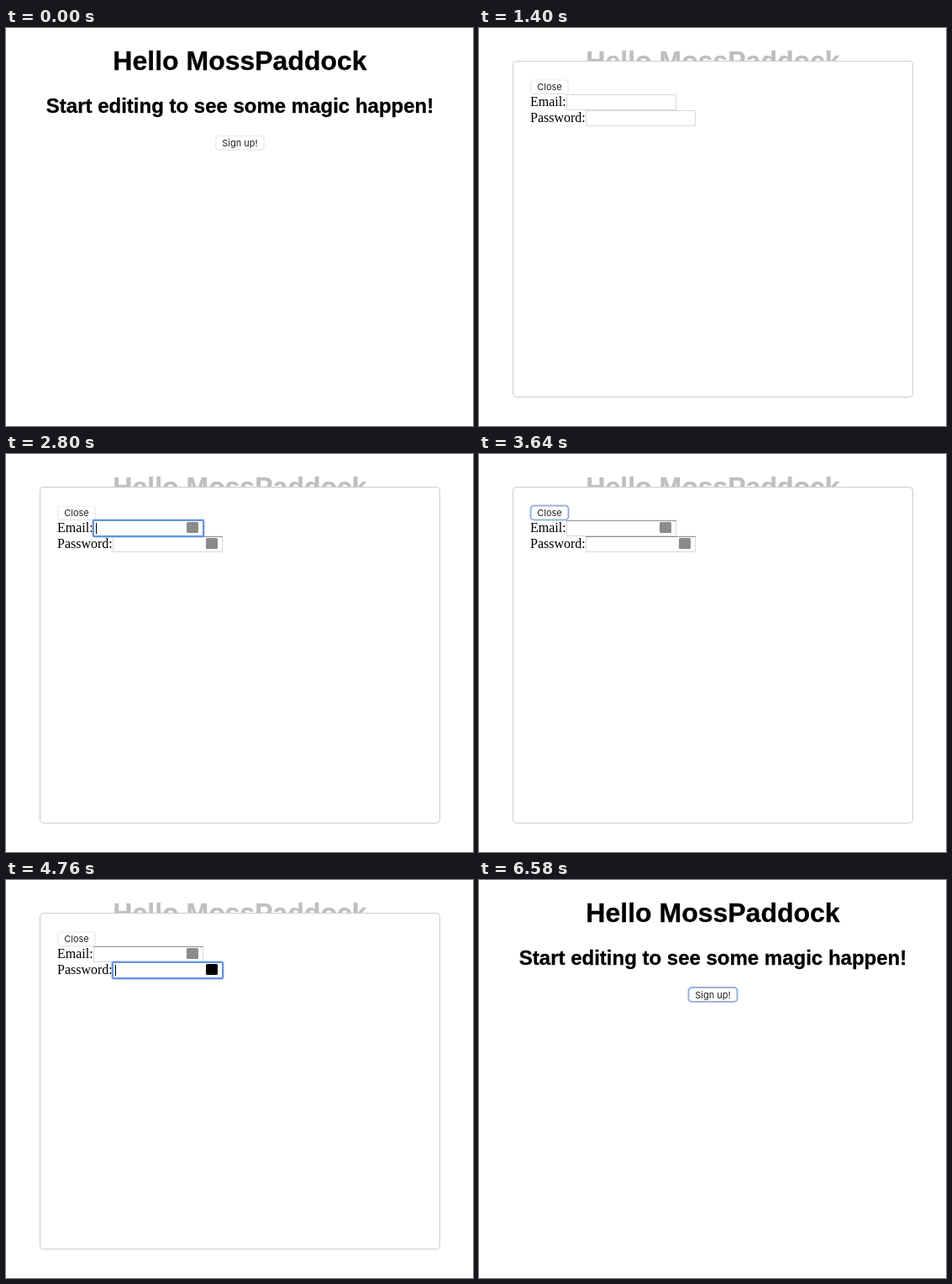
These frames come from a looping animation (556x474 px, 7.07 s). An HTML page with a canvas:

```html
<!DOCTYPE html>
<html lang="en">
<head>
<meta charset="utf-8">
<title>Sign-up dialog</title>
<style>
  html, body { margin: 0; width: 100%; height: 100%; overflow: hidden; background: #fff; }
  canvas { display: block; }
</style>
</head>
<body>
<canvas id="stage" width="556" height="474"></canvas>
<script>
const ctx = document.getElementById('stage').getContext('2d');
const LOOP = 7070;
const SANS = '"Liberation Sans", Arial, sans-serif';
const SERIF = '"Liberation Serif", Times, serif';
const UI = 'Inter, sans-serif';

const OPEN = 1400, CLOSE = 6580, FIELDS_READY = 2310, ICON_ACTIVE = 4760;

// Keyboard focus inside the dialog: [start, control]
const FOCUS = [
  [2240, 'close'], [2800, 'email'], [3220, 'password'],
  [3640, 'close'], [4200, 'email'], [4690, 'password']
];
// Times at which the caret is hidden
const CARET_OFF = [[5250, 5810], [6300, CLOSE]];

const FIELDS = [
  { id: 'email', label: 'Email:', x: 104, y: 79, baseline: 93 },
  { id: 'password', label: 'Password:', x: 127, y: 98, baseline: 112 }
];

function text(str, x, y, font, color = '#000', align = 'left') {
  ctx.font = font;
  ctx.fillStyle = color;
  ctx.textAlign = align;
  ctx.fillText(str, x, y);
}

// Bold heading with the slightly heavier stems of smoothed type
function heading(str, y, size) {
  text(str, 278.5, y, `bold ${size}px ${SANS}`, '#000', 'center');
  ctx.strokeStyle = '#000';
  ctx.lineWidth = 0.3;
  ctx.strokeText(str, 278.5, y);
}

function box(x, y, w, h, r) {
  ctx.beginPath();
  ctx.roundRect(x, y, w, h, r);
}

function fillBox(x, y, w, h, r, color) {
  box(x, y, w, h, r);
  ctx.fillStyle = color;
  ctx.fill();
}

function strokeBox(x, y, w, h, r, color, width = 1) {
  box(x, y, w, h, r);
  ctx.strokeStyle = color;
  ctx.lineWidth = width;
  ctx.stroke();
}

function button(label, x, y, w, baseline, focused) {
  const h = 17;
  if (focused) {
    fillBox(x, y, w, h, 4, '#fff');
    strokeBox(x, y, w, h, 4, '#9ab3dc', 2);
  } else {
    fillBox(x, y + 0.5, w, h, 4, '#dcdcdc');
    fillBox(x, y, w, h, 4, '#ebebeb');
    fillBox(x + 1, y + 1, w - 2, h - 1.5, 3, '#fff');
  }
  text(label, x + w / 2, baseline, '11px ' + UI, '#222', 'center');
}

function field({ id, label, x, y, baseline }, t, focused) {
  const w = 131, h = 19, ready = t >= FIELDS_READY;
  text(label, 61, baseline, '16px ' + SERIF);
  ctx.fillStyle = '#fff';
  ctx.fillRect(x, y, w, h);
  strokeBox(x + 0.5, y + 0.5, w - 1, h - 1, 0, '#d9d9d9');
  if (ready) {
    ctx.fillStyle = '#8e8e8e';
    ctx.fillRect(x, y, w, 1);
  }
  if (focused) {
    strokeBox(x, y, w, h, 2, 'rgba(90,140,225,0.35)', 4);
    strokeBox(x, y, w, h, 1, '#6594df', 2);
    ctx.fillStyle = '#fff';
    ctx.fillRect(x + 1, y + 1, w - 2, h - 2);
    if (!CARET_OFF.some(([a, b]) => t >= a && t < b)) {
      ctx.fillStyle = '#000';
      ctx.fillRect(x + 3, y + 3, 1, 13);
    }
  }
  if (ready) {
    const active = id === 'password' && t >= ICON_ACTIVE;
    fillBox(x + 111, y + 2, 14, 13, 1.5, active ? '#000' : '#8b8b8b');
  }
}

function page(t) {
  heading('Hello MossPaddock', 49.5, 32);
  heading('Start editing to see some magic happen!', 100.5, 24);
  button('Sign up!', 249.5, 128, 58, 141, t >= 70);
}

function dialog(t) {
  ctx.fillStyle = 'rgba(255,255,255,0.75)';
  ctx.fillRect(0, 0, 556, 474);
  fillBox(40, 39, 477, 401, 4, '#fff');
  strokeBox(40.5, 39.5, 476, 400, 4, '#ccc');

  const current = FOCUS.filter(([start]) => t >= start).pop();
  const focus = current ? current[1] : null;
  button('Close', 61.5, 61.5, 45, 74, focus === 'close');
  // The focused field goes last so its ring stays on top
  FIELDS.slice()
    .sort((a, b) => (a.id === focus) - (b.id === focus))
    .forEach(f => field(f, t, f.id === focus));
}

function draw(now) {
  const t = now % LOOP;
  ctx.fillStyle = '#fff';
  ctx.fillRect(0, 0, 556, 474);
  page(t);
  if (t >= OPEN && t < CLOSE) dialog(t);
}

const start = performance.now();
function tick() {
  draw(performance.now() - start);
  requestAnimationFrame(tick);
}
tick();
</script>
</body>
</html>
```
